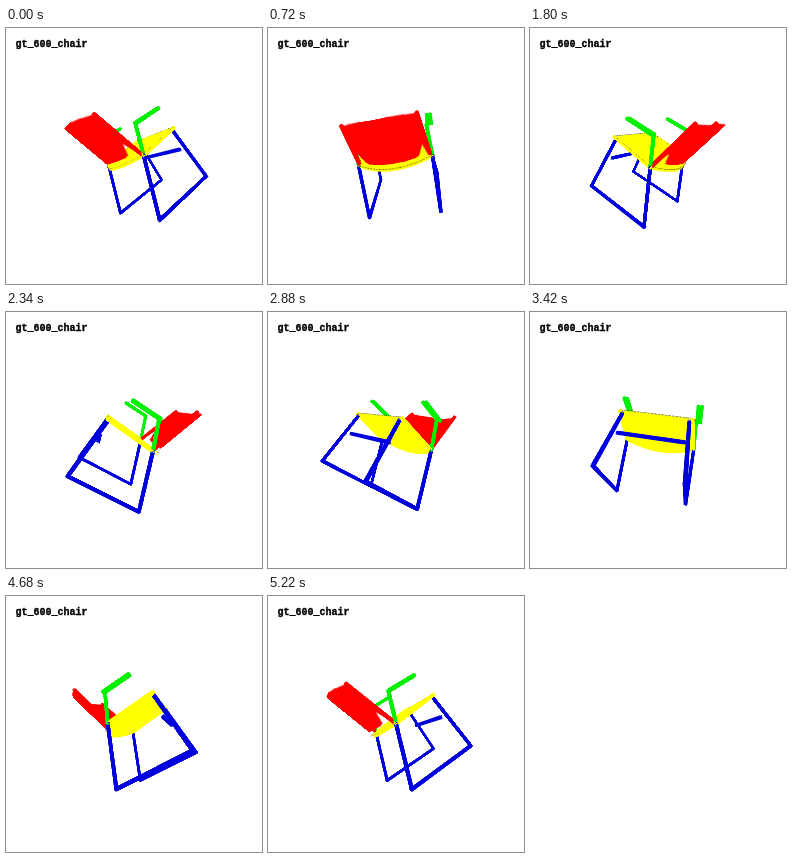
An HTML page without scripts for the animation above (5.4 s loop, 256 by 256 pixels).

```html
<!DOCTYPE html>
<html lang="en">
<head>
<meta charset="utf-8">
<title>Turning chair</title>
<style>
  html, body { margin: 0; width: 100%; height: 100%; overflow: hidden; background: #fff; }
  .stage {
    position: relative; width: 256px; height: 256px;
    overflow: hidden; background: #fff; perspective: 221.7px;
  }
  h1 {
    position: absolute; left: 9.5px; top: 11px; margin: 0;
    font: bold 10px/12px "Liberation Mono", "DejaVu Sans Mono", monospace;
    color: #000; -webkit-text-stroke: .35px #000;
  }
  .spin, .spin div, .spin i { position: absolute; transform-style: preserve-3d; }
  .spin { left: 128px; top: 128px; animation: turn 5400ms steps(30) infinite; }
  @keyframes turn {
    from { transform: rotateY(0deg); }
    to { transform: rotateY(360deg); }
  }

  /* chair axes: x forward, y down, z sideways */
  .chair {
    transform: matrix3d(.722, -.481, -.4985, 0, .48, .867, -.141, 0,
      .503, -.14, .853, 0, 27.6, 41.7, -9.15, 1);
  }
  .mirror { transform: scaleZ(-1); }

  /* round rod made of three crossed strips */
  i {
    --a: 0deg; --b: 0deg;
    left: -1.5px; top: -1.75px; height: 3.5px;
    width: calc(var(--l) + 3px);
    border-radius: 1.75px; background: #00d;
    transform-origin: 1.5px 50%;
    transform: translate3d(var(--x), var(--y), var(--z)) rotateZ(var(--a)) rotateY(var(--b));
  }
  i::before, i::after {
    content: ""; position: absolute; inset: 0;
    border-radius: inherit; background: inherit; transform: rotateX(60deg);
  }
  i::after { transform: rotateX(-60deg); }

  .cross { --x: 26px; --y: -36px; --z: -29.5px; --l: 59px; --b: -90deg; }
  .front { --x: 28px; --y: -55.5px; --z: 30.5px; --l: 56.2px; --a: 83.3deg; --b: -5.6deg; }
  .floor { --x: -34.5px; --y: 0px; --z: 36px; --l: 69px; }
  .rear  { --x: -34.5px; --y: 0px; --z: 36px; --l: 55px; --a: -72.6deg; }
  .post, .pad { background: #00f000; }
  .post  { --x: -18px; --y: -52.5px; --z: 36px; --l: 28px; --a: -71.2deg; --b: 3deg; }
  .pad   { --x: -9px; --y: -79px; --z: 35.5px; --l: 27px; --a: -3.2deg; }
  .outer { --z: 38.7px; }
  .rail  { --x: -18px; --y: -52.5px; --z: 36px; --l: 47.3px; --a: -6.1deg; --b: 3.6deg; background: #ff0; }
  .stile { --x: -36px; --y: -100.5px; --z: 30.5px; --l: 50px; --a: 68.8deg; --b: -4.6deg; background: #f00; }

  .seat {
    --y: -53.5px;
    position: absolute; left: -16px; top: -38px; width: 66px; height: 76px;
    transform-origin: 16px 38px;
    transform: translate3d(-18px, var(--y), 0) rotateZ(-6.1deg) rotateX(90deg);
  }
  .under { --y: -51px; }
  .seat path { fill: #ff0; }
  .rim { stroke: #000; stroke-width: .7; stroke-dasharray: 2 1.2; }

  /* curved back: three overlapping strips per half */
  .back { transform: matrix3d(1, 0, 0, 0, .36, .93, 0, 0, 0, 0, 1, 0, -36, -100.5, 0, 1); }
  .back b {
    position: absolute; left: -1px; top: -5px; height: 52px;
    background: #f00; transform-origin: 1px 5px;
    transform: translate3d(var(--x), 0, var(--z)) rotateY(var(--b));
  }
  .mid  { --x: -12px; --z: 0px; --b: -83deg; width: 12.8px; }
  .next { --x: -10.7px; --z: 10.7px; --b: -69.3deg; width: 13.3px; clip-path: polygon(0 0, 100% 2px, 100% 100%, 0 100%); }
  .back .edge {
    --x: -6.7px; --z: 21.3px; --b: -57.9deg; width: 17px; height: 56px;
    clip-path: polygon(0 2px, 13px 5px, 16.5px 56px, 14px 55px, 10.5px 39px, 5px 51px, 0 52px);
  }
</style>
</head>
<body>
<div class="stage">
  <h1>gt_600_chair</h1>
  <div class="spin">
    <div class="chair">
      <svg class="seat" viewBox="-16 -38 66 76"><path id="pan" class="rim" d="M47.3-33V33L0 36Q-26 0 0-36Z"/></svg>
      <svg class="seat under" viewBox="-16 -38 66 76"><path d="M47.3-33V33L0 36Q-26 0 0-36Z"/></svg>
      <i class="cross"></i>
      <div class="side">
        <i class="front"></i><i class="floor"></i><i class="rear"></i>
        <i class="post"></i><i class="pad"></i><i class="pad outer"></i><i class="rail"></i><i class="stile"></i>
        <div class="back"><b class="mid"></b><b class="next"></b><b class="edge"></b></div>
      </div>
      <div class="side mirror">
        <i class="front"></i><i class="floor"></i><i class="rear"></i>
        <i class="post"></i><i class="pad"></i><i class="pad outer"></i><i class="rail"></i><i class="stile"></i>
        <div class="back"><b class="mid"></b><b class="next"></b><b class="edge"></b></div>
      </div>
    </div>
  </div>
</div>
</body>
</html>
```
